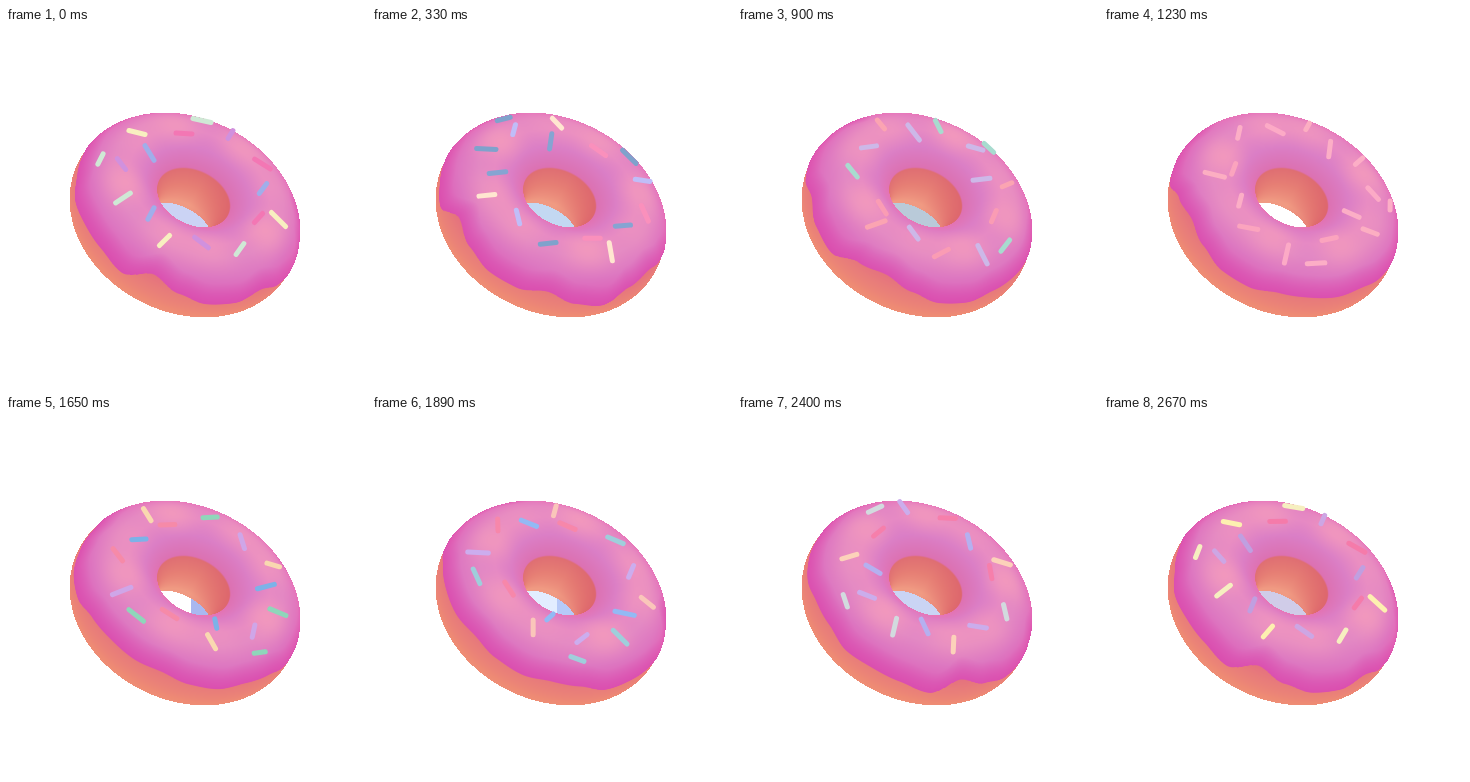
These frames come from a looping animation (360 by 360 pixels, 2.7 s). An HTML page with a canvas:

```html
<!DOCTYPE html>
<html lang="en">
<head>
<meta charset="utf-8">
<title>Donut</title>
<style>
  html, body { margin: 0; width: 100%; height: 100%; overflow: hidden; background: #fff; }
  canvas { display: block; width: 100%; height: 100%; }
</style>
</head>
<body>
<canvas id="stage" width="360" height="360"></canvas>
<script>
const SIZE = 360, STEP = 30, STEPS = 90, DEG = Math.PI / 180;

// Tilted torus, seen without perspective
const CX = 178.5, CY = 187.5, RING = 74.4, DOUGH = 44.4, ICING = 45.4;
const ROLL = 27 * DEG, AX = Math.cos(ROLL), AY = Math.sin(ROLL);
const C = 0.7, S = Math.sqrt(1 - C * C);
const INNER_EDGE = 142;

const ctx = document.getElementById('stage').getContext('2d');
const image = ctx.createImageData(SIZE, SIZE);

const clamp = v => Math.max(0, Math.min(1, v));
const smooth = v => { v = clamp(v); return v * v * (3 - 2 * v); };
const mix = (a, b, k) => a.map((v, i) => v + (b[i] - v) * k);
const rgb = hex => [1, 3, 5].map(i => parseInt(hex.slice(i, i + 2), 16));
const css = c => `rgb(${c.map(Math.round).join()})`;

function ramp(stops, v) {
  let i = 1;
  while (i < stops.length - 1 && v > stops[i][0]) i++;
  const [v0, a] = stops[i - 1], [v1, b] = stops[i];
  return mix(a, b, clamp((v - v0) / (v1 - v0)));
}
const stops = list => list.map(([v, hex]) => [v, rgb(hex)]);

const toPlane = (x, y) => {
  const dx = x - CX, dy = y - CY;
  return [dx * AX + dy * AY, dy * AX - dx * AY];
};

// First point of the torus under a stage position
function hit(x, y, tube) {
  const [p, q] = toPlane(x, y);
  for (let i = 0, t = 140; i < 120 && t > -140; i++) {
    const Y = C * q + S * t, z = C * t - S * q;
    const rho = Math.sqrt(p * p + Y * Y), out = rho - RING;
    const d = Math.sqrt(out * out + z * z) - tube;
    if (d < 0.08) {
      const a = Math.atan2(z, out);
      let theta = a / DEG;
      if (theta < -90) theta += 360;
      return {
        p, theta, phi: Math.atan2(Y, p) / DEG,
        facing: S * Math.cos(a) * Y / rho + C * Math.sin(a)
      };
    }
    t -= d;
  }
  return null;
}

// Point on the upper icing, also just past its outline
function onTop(x, y) {
  const [p, q] = toPlane(x, y);
  let z = 41, Y, rho;
  for (let i = 0; i < 5; i++) {
    Y = (q + S * z) / C;
    rho = Math.hypot(p, Y);
    if (i < 4) z = (z + Math.sqrt(Math.max(0, ICING ** 2 - (rho - RING) ** 2))) / 2;
  }
  return { rho, z, phi: Math.atan2(Y, p) / DEG };
}

function project(rho, phi, z) {
  const p = rho * Math.cos(phi * DEG), q = C * rho * Math.sin(phi * DEG) - S * z;
  return [CX + p * AX - q * AY, CY + p * AY + q * AX];
}

// Lower rim of the icing, one tube angle per 15 degrees
const RIM = [2, 7, 18, 7, 6, 14, 26, 3, 9, 10, 8, 16, 17, 12, 14, 19, 16, 17, 16, 8, 8, 17, 26, 20];
const rim = Float32Array.from({ length: 720 }, (_, i) => {
  const n = Math.floor(i / 30);
  return RIM[n] + (RIM[(n + 1) % 24] - RIM[n]) * smooth(i / 30 - n);
});
const blotch = Float32Array.from({ length: 720 }, (_, i) => {
  const a = i / 2 * DEG;
  return 0.5 + 0.3 * Math.sin(5 * a + 1) + 0.2 * Math.sin(8 * a);
});

const ICE = stops([[0, '#da52b0'], [20, '#dc60b8'], [45, '#dd78c1'], [70, '#e288c4'],
  [90, '#e68ac4'], [115, '#da7ec6'], [143, '#dc70b0']]);
const CRUST = stops([[-60, '#f09478'], [-20, '#ee8a74'], [10, '#e87c7a'], [25, '#e5727e']]);
const WALL = stops([[140, '#de6c72'], [165, '#e67e74'], [200, '#f09a82']]);
const RIM_PINK = rgb('#ee76b6'), DEEP = rgb('#da4cae'), PALE = rgb('#f59cbb'), RED = rgb('#dc6068');

const iceColor = h => mix(ramp(ICE, h.theta), RIM_PINK, 0.9 * Math.pow(1 - clamp(h.facing), 3));
const doughColor = h => h.theta > 110
  ? mix(ramp(WALL, h.theta), RED, 0.6 * clamp(h.p / 40))
  : ramp(CRUST, h.theta);

// The torus stays put; only its pattern turns
const pixels = [], hole = [];
image.data.fill(255);
for (let y = 0; y < SIZE; y++) {
  for (let x = 0; x < SIZE; x++) {
    const [p, q] = toPlane(x + 0.5, y + 0.5);
    if (p * p + q * q > 125 * 125) continue;
    const at = (y * SIZE + x) * 4;
    const top = hit(x + 0.5, y + 0.5, ICING), base = hit(x + 0.5, y + 0.5, DOUGH);
    const inHole = !base && p * p + q * q < 45 * 45;
    if (inHole) hole.push({ at, right: x > 184 });
    if (!top && !base) continue;
    pixels.push({
      at, inHole,
      under: base ? doughColor(base) : null,
      ice: top ? iceColor(top) : null,
      theta: top ? top.theta : 0,
      turn: top ? Math.round((top.phi + 720) * 2) : 0,
      inner: top ? smooth((INNER_EDGE + 1.5 - top.theta) / 3) : 0,
      patch: top ? 0.75 * smooth(1 - Math.abs(top.theta - 82) / 42) : 0
    });
  }
}

// Kind (yellow, mint, blue, purple, pink) and both ends at the start
const SPRINKLES = [
  [0, 121, 102, 141, 107], [4, 168, 105, 188, 106], [1, 185, 90, 207, 95], [3, 221, 112, 228, 101],
  [4, 247, 130, 266, 142], [2, 252, 167, 262, 154], [0, 264, 183, 281, 200], [4, 247, 196, 258, 184],
  [1, 229, 228, 239, 214], [3, 187, 208, 204, 221], [0, 152, 219, 165, 206], [2, 141, 193, 149, 178],
  [1, 108, 176, 126, 164], [3, 110, 129, 121, 143], [1, 91, 138, 98, 124], [2, 138, 116, 149, 134]
].map(([kind, x0, y0, x1, y1]) => {
  const inset = 2 / Math.hypot(x1 - x0, y1 - y0), dx = (x1 - x0) * inset, dy = (y1 - y0) * inset;
  return { kind, ends: [onTop(x0 + dx, y0 + dy), onTop(x1 - dx, y1 - dy)] };
});

// Time, five sprinkle colours, left and right side of the hole
const TINTS = [
  [0, '#f8efc0', '#cfe8d5', '#a0aeea', '#d091de', '#f377b4', '#cbd3f4', '#cbd3f4'],
  [330, '#ffe6d0', '#7fa2cc', '#86a4d2', '#c0bdf8', '#fa90bc', '#c3d8f2', '#c3d8f2'],
  [900, '#fba4b2', '#a8dbcf', '#cdb8e8', '#cdb8e8', '#fa9cb4', '#b9cad9', '#b9cad9'],
  [1230, '#fcaec2', '#fcaec6', '#fcaec6', '#fcaac6', '#fba4be', '#ffffff', '#ffffff'],
  [1650, '#f9d8b0', '#8fd6ba', '#7cb2e8', '#cfa6e8', '#f68aa8', '#ffffff', '#a9b8f0'],
  [2130, '#fbb4c4', '#aec5fb', '#a9c0ff', '#c9b4f3', '#f783ac', '#c4dbff', '#c4dbff'],
  [2670, '#fdf0b0', '#f6efc0', '#c09fe0', '#cda6e4', '#f57baa', '#d0cce8', '#d0cce8']
];
const tints = [1, 2, 3, 4, 5, 6, 7].map(i => stops(TINTS.map(row => [row[0], row[i]])));

function render(step) {
  const data = image.data, shift = step * 8;
  const colors = tints.map(t => ramp(t, step * STEP));

  for (const { at, right } of hole) {
    const c = colors[right ? 6 : 5];
    for (let i = 0; i < 3; i++) data[at + i] = c[i];
  }
  for (const px of pixels) {
    const { at, under, ice } = px;
    let cover = 0, deep = 0, pale = 0;
    if (ice) {
      const n = (px.turn - shift + 1440) % 720, above = px.theta - rim[n];
      cover = px.inner * smooth((above + 1) / 2);
      deep = 0.8 * (1 - clamp(above / 30));
      pale = px.patch * blotch[n];
    }
    if (!under && cover < 0.5) {
      if (!px.inHole) data[at] = data[at + 1] = data[at + 2] = 255;
      continue;
    }
    for (let i = 0; i < 3; i++) {
      let v = 0;
      if (ice) {
        v = ice[i] + (PALE[i] - ice[i]) * pale;
        v += (DEEP[i] - v) * deep;
      }
      data[at + i] = under ? under[i] + (v - under[i]) * cover : v;
    }
  }
  ctx.putImageData(image, 0, 0);

  ctx.lineWidth = 5;
  ctx.lineCap = 'round';
  for (const { kind, ends } of SPRINKLES) {
    ctx.strokeStyle = css(colors[kind]);
    ctx.beginPath();
    for (const e of ends) ctx.lineTo(...project(e.rho, e.phi + step * 4, e.z));
    ctx.stroke();
  }
}

let shown = -1;
const start = performance.now();
function tick() {
  const step = Math.floor((performance.now() - start) / STEP) % STEPS;
  if (step !== shown) render(shown = step);
  requestAnimationFrame(tick);
}
tick();
</script>
</body>
</html>
```
